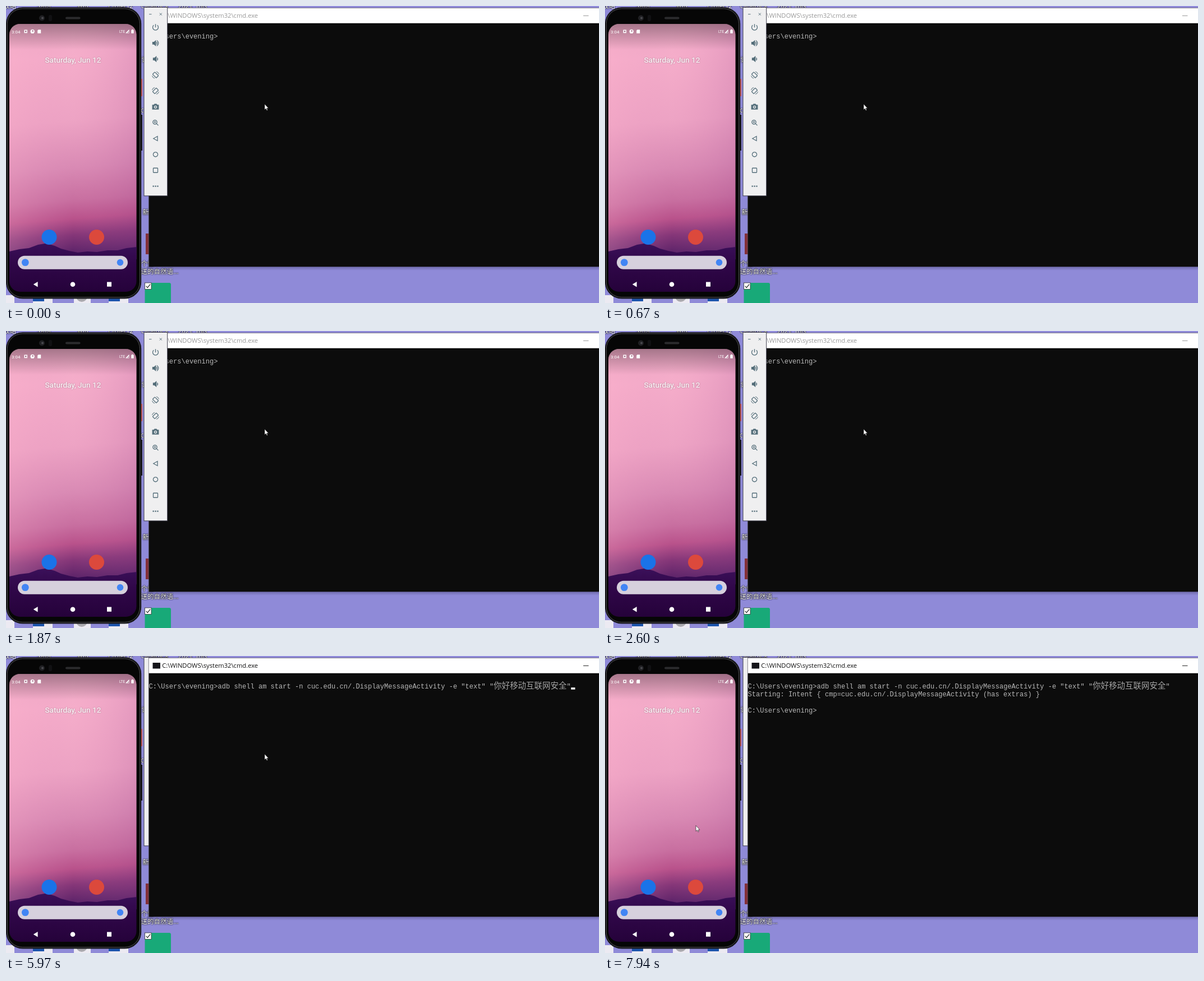
An HTML page that plays this animation: 1057 by 530 pixels, repeating every 8 s.

```html
<!DOCTYPE html>
<html lang="en">
<head>
<meta charset="utf-8">
<title>Emulator and command prompt</title>
<style>
  html, body { margin: 0; width: 100%; height: 100%; overflow: hidden; background: #8f8ad8; }
  svg { display: block; width: 100vw; height: 100vh; }
  .label { font: 11.5px "Noto Sans CJK SC", "Noto Sans", sans-serif; fill: #fff; filter: drop-shadow(.5px .6px .4px #000) drop-shadow(.5px .6px .8px #000); }
  .title { font: 11.2px "Open Sans", "Noto Sans", "Noto Sans CJK SC", sans-serif; }
  .term { font: 12.06px "Liberation Mono", monospace; fill: #b8b8b8; white-space: pre; }
  .cjk { font: 300 14.47px "Noto Sans CJK SC", sans-serif; fill: #a4a4a4; }
  .phone { font-family: Roboto, sans-serif; fill: #fff; }
  .icons { fill: none; stroke: #546e7a; stroke-width: 1.3; }
  .icons .solid { fill: #546e7a; }
</style>
</head>
<body>
<svg viewBox="0 0 1057 530" preserveAspectRatio="none">
  <defs>
    <linearGradient id="sky" gradientUnits="userSpaceOnUse" x1="100" y1="32" x2="132" y2="445">
      <stop offset="0" stop-color="#eda9c5"/>
      <stop offset=".14" stop-color="#f5adca"/>
      <stop offset=".42" stop-color="#eda3c4"/>
      <stop offset=".62" stop-color="#d98ab4"/>
      <stop offset=".76" stop-color="#c86fa0"/>
      <stop offset=".84" stop-color="#b9528b"/>
      <stop offset=".91" stop-color="#853678"/>
      <stop offset="1" stop-color="#552066"/>
    </linearGradient>
    <linearGradient id="side">
      <stop offset="0" stop-color="#ffb0cb" stop-opacity=".26"/>
      <stop offset=".5" stop-color="#e08cba" stop-opacity="0"/>
      <stop offset="1" stop-color="#a04c92" stop-opacity=".2"/>
    </linearGradient>
    <linearGradient id="scrim" x2="0" y2="1">
      <stop offset="0" stop-opacity=".3"/>
      <stop offset="1" stop-opacity="0"/>
    </linearGradient>
    <linearGradient id="hill" x2="0" y2="1">
      <stop offset="0" stop-color="#3b105a"/>
      <stop offset=".4" stop-color="#300749"/>
      <stop offset="1" stop-color="#25023a"/>
    </linearGradient>
    <linearGradient id="fall" x2="0" y2="1">
      <stop offset="0" stop-color="#29264a" stop-opacity=".32"/>
      <stop offset="1" stop-color="#29264a" stop-opacity="0"/>
    </linearGradient>
    <clipPath id="screen"><rect x="6" y="32" width="226.5" height="478" rx="19"/></clipPath>
  </defs>

  <!-- Desktop -->
  <rect width="1057" height="530" fill="#8f8ad8"/>
  <g class="label">
    <text x="-5" y="4">改站</text>
    <text x="55" y="4">Java</text>
    <text x="127" y="4">Wifi</text>
    <text x="182" y="4">Project2</text>
    <text x="241" y="4">catalog X</text>
    <text x="307" y="4">2021_mis</text>
    <text x="241.5" y="99.5">记</text>
    <text x="240" y="189.5">c</text>
    <text x="243.5" y="372">新</text>
    <text x="240.5" y="463.5">个性</text>
    <text x="240.5" y="478">送的自然语...</text>
  </g>
  <path d="M238 130h5v31h-5z" fill="#d8605c"/>
  <path d="M238 194h5v64h-5z" fill="#17171c"/>
  <rect x="249" y="406" width="30" height="37" fill="#843038"/>
  <path d="M0 516h15v14H0zM48 516h35v14H48zM183 516h35v14h-35z" fill="#eceaf2"/>
  <path d="M48 516h20v11H48zM183 516h20v11h-20z" fill="#1d55ad"/>
  <path d="M121 516h30v14h-30z" fill="#eceaf2"/>
  <circle cx="135" cy="518" r="10" fill="#aaa9ae"/>
  <rect x="247.5" y="494" width="46.5" height="42" rx="3" fill="#18a978"/>
  <rect x="247.5" y="494" width="11.5" height="11.5" fill="#fff" stroke="#333" stroke-width=".8"/>
  <path d="M249.8 499.8l2.5 2.8 4.8-6" fill="none" stroke="#222" stroke-width="1.2"/>

  <g id="stack">
    <g id="panel">
      <rect x="246" y="2.5" width="41.7" height="336.3" fill="#efeff0" stroke="#3f3e4d"/>
      <g class="icons" id="tools"></g>
    </g>
    <g id="window">
      <rect x="251" y="465" width="806" height="7" fill="url(#fall)"/>
      <rect x="254" y="3.5" width="803" height="27.5" fill="#fff"/>
      <rect x="254.5" y="30.7" width="803" height="434.6" fill="#0c0c0c"/>
      <path d="M254 3.5H1057M254.3 3.5V465" stroke="#55525f" stroke-width=".7"/>
      <rect x="261.5" y="12" width="13.5" height="10.5" fill="#15151a"/>
      <text class="title" id="title" x="278.3" y="21"></text>
      <path id="min" d="M1029 17.4h9.5" stroke-width="1"/>
      <g id="lines"></g>
      <rect id="caret" width="7.3" height="3.6" fill="#f2f2f2"/>
    </g>
  </g>

  <!-- Phone -->
  <rect x=".6" y="2.8" width="240" height="519" rx="29" fill="#090909" stroke="#1d1d22" stroke-width="1.2"/>
  <rect x="2.3" y="4.8" width="236.3" height="515" rx="27" fill="none" stroke="#58585c" stroke-width=".9"/>
  <rect x="4" y="6.5" width="232.6" height="511.5" rx="25" fill="#060606"/>
  <circle cx="64" cy="21.5" r="5" fill="#202023"/>
  <circle cx="65" cy="21.5" r="2" fill="#4a4a50"/>
  <rect x="76" y="16" width="6" height="11" rx="2" fill="#111113"/>
  <rect x="106" y="19.5" width="26.5" height="4" rx="2" fill="#2b2b2d"/>
  <g clip-path="url(#screen)">
    <rect x="6" y="32" width="227" height="420" fill="url(#sky)"/>
    <rect x="6" y="32" width="227" height="420" fill="url(#side)"/>
    <rect x="6" y="32" width="227" height="46" fill="url(#scrim)"/>
    <path d="M6 438L24 434 41 432 57 426 72 423.5 87 428 98 433 113 437 128 440 145 438 162 439 181 436 199 436 215 432 233 430V511H6z" fill="url(#hill)"/>
  </g>
  <g class="phone">
    <text x="10" y="48.5" font-size="8">3:04</text>
    <path d="M32.5 42.5h5.5v5.8h-5.5zM57.5 42.3h4.7v6.5h-6v-5z"/>
    <path d="M34 44h2.5v2.5H34z" fill="#a56f8b"/>
    <circle cx="47.2" cy="45.4" r="3.6"/>
    <path d="M46.5 43.3h2.2v2.4h-2.2z" fill="#a56f8b"/>
    <text x="202" y="48" font-size="6.4">LTE</text>
    <path d="M213 48.6l6.5-6.8v6.8zM223.3 42.8h1.2v-1h2v1h1.2v6h-4.4z"/>
    <path d="M216 47.8l3-3v3z" fill="#b98aa3"/>
    <text x="119.4" y="100.8" font-size="13.6" text-anchor="middle" style="filter:drop-shadow(.4px .6px .8px #5558)">Saturday, Jun 12</text>
    <circle cx="77" cy="412.5" r="13.5" fill="#1a73e8"/>
    <circle cx="161.5" cy="412.5" r="13.5" fill="#dc493c"/>
    <rect x="21" y="445.7" width="196" height="24" rx="12" fill="#d6d0dd"/>
    <circle cx="34.3" cy="457.6" r="6.4" fill="#4285f4"/>
    <circle cx="203.5" cy="457.6" r="5.8" fill="#4285f4"/>
    <path d="M48.8 496.7l7.8-4.8v9.6zM180 492.5h8v8.2h-8z"/>
    <circle cx="119" cy="496.7" r="4.3"/>
  </g>

  <path id="mouse" d="M0 0V10.2L2.3 8.1 3.9 11.5 5.4 10.8 3.9 7.6H7z" fill="#fff" stroke="#111" stroke-width=".6"/>
</svg>

<script>
const $ = id => document.getElementById(id);
const LOOP = 8000, CELL = 7.236, LEFT = 254.6, ROW = 14.5;
const FOCUS = 2770, PASTE = 5140, ENTER = 6070, BUSY = 6140, REPLY = 6370, DONE = 6540, PROMPT = 6570;

const path = 'C:\\WINDOWS\\system32\\cmd.exe';
const prompt = 'C:\\Users\\evening>';
const command = 'adb shell am start -n cuc.edu.cn/.DisplayMessageActivity -e "text" "';
const message = '你好移动互联网安全';
const reply = 'Starting: Intent { cmp=cuc.edu.cn/.DisplayMessageActivity (has extras) }';
const fullCells = prompt.length + command.length + message.length * 2 + 1;

// Tool strip, each icon drawn around its own centre
const turn = '<rect x="-2.8" y="-4.6" width="5.6" height="9.2" rx=".8" transform="rotate(-45)"/>' +
  '<path d="M1.5-6Q5.4-5 6-1.4M-1.5 6Q-5.4 5-6 1.4" stroke-width="1"/>';
const tools = [
  '<path d="M-3.2-3.8A5 5 0 1 0 3.2-3.8M0-5.8V.3"/>',
  '<path class="solid" d="M-5-1.7h2.3L.2-4.2v8.4l-2.9-2.5H-5z"/><path d="M2-2.4q2 2.4 0 4.8M2.6-5q5.4 5 0 10"/>',
  '<path class="solid" d="M-4-1.7h2.3L1.2-4.2v8.4l-2.9-2.5H-4z"/><path d="M3-2.3q2 2.3 0 4.6"/>',
  turn,
  `<g transform="scale(-1 1)">${turn}</g>`,
  '<path class="solid" d="M-5.3-3h2.5l1.2-1.6h3.2L2.8-3h2.5v7.2H-5.3z"/><circle cy=".5" r="2" stroke="#efeff0"/>',
  '<circle cx="-1" cy="-1" r="3.6"/><path d="M1.7 1.7L5 5M-2.7-1H.7M-1-2.7V.7"/>',
  '<path d="M-3.7 0L3.5-4V4z"/>',
  '<circle r="4.1"/>',
  '<rect x="-4" y="-4" width="8" height="8" rx=".8"/>',
  '<path d="M-5 0h2.3M-1.1 0h2.3M2.8 0h2.3" stroke-width="2.3"/>'
];
$('tools').innerHTML = '<path d="M255 14.7h4.5M273.8 12.6l4 4m0-4l-4 4" stroke-width="1"/>' +
  tools.map((icon, i) => `<g transform="translate(266.5 ${38 + i * 28.36})">${icon}</g>`).join('');

function addLine(row, text) {
  const el = document.createElementNS('http://www.w3.org/2000/svg', 'text');
  el.setAttribute('class', 'term');
  el.setAttribute('x', LEFT);
  el.setAttribute('y', 57.7 + row * ROW);
  el.innerHTML = text;
  $('lines').append(el);
  return el;
}
addLine(0, prompt.replace('>', '&gt;'));
const typed = addLine(0, `${command}<tspan class="cjk">${message}</tspan>"`);
typed.setAttribute('x', LEFT + prompt.length * CELL);
const answer = addLine(1, reply);
const again = addLine(3, prompt.replace('>', '&gt;'));

const show = (el, on) => el.setAttribute('visibility', on ? 'visible' : 'hidden');

// Last entry whose start time has passed
const at = (steps, t) => steps.filter(s => s[0] <= t).pop();

const caretSteps = [
  [0, 0], [3300, 1], [3840, 0], [4370, 1], [4900, 0],
  [PASTE, 1], [5440, 0], [5970, 1], [7470, 0]
];
const caretSpots = [
  [0, prompt.length, 0], [PASTE, fullCells, 0], [ENTER, 0, 1],
  [REPLY, 0, 2], [PROMPT, prompt.length, 3]
];
const mouseSteps = [
  [0, 461, 175], [7470, 410, 198], [7520, 325, 238],
  [7570, 276.3, 258.3], [7940, 162, 302.5]
];

let front = null;
function update(t) {
  const active = t >= FOCUS;
  if (active !== front) {
    front = active;
    $('stack').append(active ? $('window') : $('panel'));
    $('title').setAttribute('fill', active ? '#111' : '#999');
    $('min').setAttribute('stroke', active ? '#222' : '#999');
  }
  const busy = t >= BUSY && t < DONE;
  $('title').textContent = path + (busy ? ` - ${command}${message}"` : '');
  show(typed, t >= PASTE);
  show(answer, t >= REPLY);
  show(again, t >= PROMPT);

  const [, col, row] = at(caretSpots, t);
  $('caret').setAttribute('x', LEFT + col * CELL);
  $('caret').setAttribute('y', 56.2 + row * ROW);
  show($('caret'), at(caretSteps, t)[1]);

  const [, x, y] = at(mouseSteps, t);
  $('mouse').setAttribute('transform', `translate(${x} ${y})`);
}

const start = performance.now();
function tick() {
  update((performance.now() - start) % LOOP);
  requestAnimationFrame(tick);
}
tick();
</script>
</body>
</html>
```
